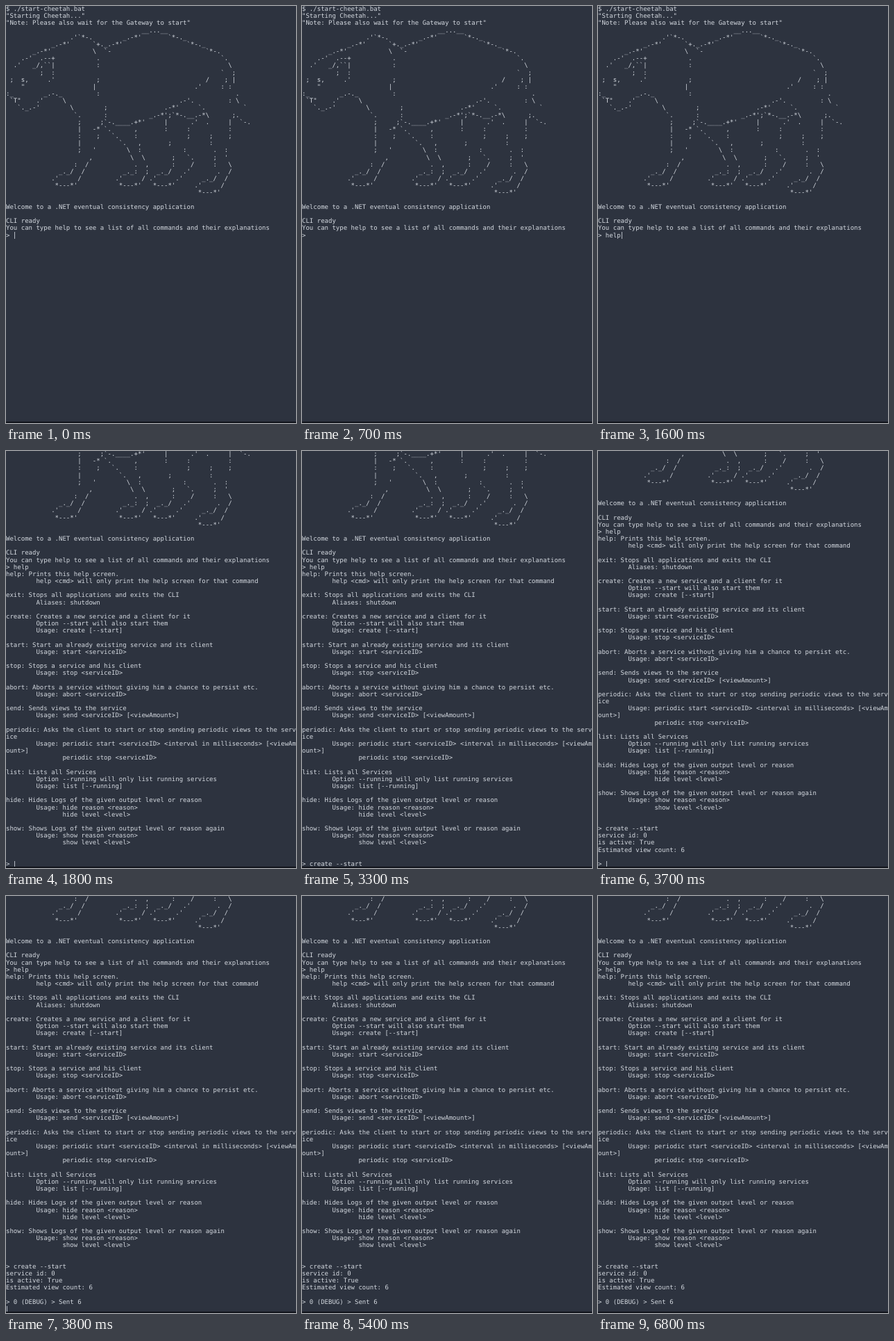
These frames come from a looping animation (418 px wide and 600 px high, 7000 ms). An HTML page:

```html
<!DOCTYPE html>
<html lang="en">
<head>
<meta charset="utf-8">
<title>Terminal session</title>
<style>
html, body { margin: 0; width: 100%; height: 100%; overflow: hidden; background: #2d333f; }
#stage { position: relative; width: 418px; height: 600px; overflow: hidden; background: #2d333f; }
#screen {
  position: absolute; left: 0; top: 0; margin: 0; color: #d3d8df;
  font: 9.02px/10.17px "DejaVu Sans Mono", "Liberation Mono", monospace;
  text-rendering: geometricPrecision; font-variant-ligatures: none;
}
#cursor { position: absolute; width: 1px; height: 10px; background: #b4bac3; }
#edge { position: absolute; left: 0; bottom: 0; width: 100%; height: 2px; background: #12151c; }
</style>
</head>
<body>
<div id="stage">
  <pre id="screen"></pre>
  <div id="cursor"></div>
  <div id="edge"></div>
</div>

<!-- Each row: column, glyphs, column, glyphs ... -->
<script type="text/plain" id="art">
36 __...__
17 .'`*-. 31 _.-*' 43 `*-._
12 _.-*' 23 `+._.-*' 48 `*-._
7 _.-*' 23 \ 26 `- 53 `*-.
4 .-' 9 .--+ 24 . 57 `.
2 .' 7 _/,``| 24 : 59 \
9 ; 12 : 57 ` 60 ;
1 ; 4 s, 11 .' 24 ; 53 / 58 ; 60 |
4 " 23 | 50 .' 57 : 59 :
0 :_ 10 _.-._ 24 : 61 .
1 `T" 8 .' 15 \ 46 .-'. 59 : 61 \
3 `._.-' 17 \ 26 ; 42 .-*' 51 `. 63 `
18 `. 26 : 38 _.-*';`*-.__.-*\ 60 ;.
19 ; 25 ;`-.____.+*' 42 | 49 .' 53 . 59 | 62 `-.
19 | 23 -* 26 `. 34 , 42 : 48 : 59 :
19 : 24 ; 28 `. 34 : 48 ; 54 ; 59 ;
19 | 30 `. 35 , 43 ; 54 :
19 ; 23 ' 32 \ 35 : 47 : 55 . 58 :
22 , 33 \ 36 \ 44 ; 48 `. 55 ; 58 '
18 : 21 / 34 . 37 , 44 : 49 / 55 : 59 \
14 _._/ 20 / 31 _._: 37 ; 40 _._/ 47 .' 56 . 59 /
12 .' 19 / 29 .' 36 / 38 .' 45 .' 52 _._/ 58 /
13 *---*' 30 *---*' 39 *---*' 50 .' 57 /
51 *---*'
</script>

<script type="text/plain" id="help">
help: Prints this help screen.
        help <cmd> will only print the help screen for that command

exit: Stops all applications and exits the CLI
        Aliases: shutdown

create: Creates a new service and a client for it
        Option --start will also start them
        Usage: create [--start]

start: Start an already existing service and its client
        Usage: start <serviceID>

stop: Stops a service and his client
        Usage: stop <serviceID>

abort: Aborts a service without giving him a chance to persist etc.
        Usage: abort <serviceID>

send: Sends views to the service
        Usage: send <serviceID> [<viewAmount>]

periodic: Asks the client to start or stop sending periodic views to the service
        Usage: periodic start <serviceID> <interval in milliseconds> [<viewAmount>]
               periodic stop <serviceID>

list: Lists all Services
        Option --running will only list running services
        Usage: list [--running]

hide: Hides Logs of the given output level or reason
        Usage: hide reason <reason>
               hide level <level>

show: Shows Logs of the given output level or reason again
        Usage: show reason <reason>
               show level <level>
</script>

<script>
const LOOP = 7000, COLS = 77, ROWS = 59, CELL_W = 5.43, CELL_H = 10.17;
const $ = id => document.getElementById(id);
const block = id => $(id).textContent.replace(/^\n|\n$/g, "");

const drawRow = row => row.split(" ").reduce(
  (line, part, i) => i % 2 ? line + part : line.padEnd(+part), "");

const intro = `$ ./start-cheetah.bat
"Starting Cheetah..."
"Note: Please also wait for the Gateway to start"
${block("art").split("\n").map(drawRow).join("\n")}

Welcome to a .NET eventual consistency application

CLI ready
You can type help to see a list of all commands and their explanations
> `;

// Output appended to the terminal at each time
const output = [
  [0, intro],
  [1100, "h"], [1200, "e"], [1400, "l"], [1600, "p"],
  [1800, "\n" + block("help") + "\n\n\n> "],
  [2700, "create --start"],
  [3400, "\n"],
  [3600, "service id: 0\nis active: True\nEstimated view count: 6\n\n> "],
  [3800, "0 (DEBUG) > Sent 6\n"],
];
// The cursor starts visible and flips at each time
const blinks = [400, 900, 2300, 2800, 3300, 3400, 4300, 4800, 5400, 5900, 6500];

const wrap = line => line.match(new RegExp(`.{1,${COLS}}`, "g")) || [""];

function render(t) {
  const text = output.filter(([at]) => at <= t).map(([, s]) => s).join("");
  const rows = text.split("\n").flatMap(wrap).slice(-ROWS);
  const shown = rows.join("\n");
  if ($("screen").textContent !== shown) $("screen").textContent = shown;

  const style = $("cursor").style;
  style.left = Math.round(rows.at(-1).length * CELL_W + 1) + "px";
  style.top = Math.round((rows.length - 1) * CELL_H) + "px";
  style.visibility = blinks.filter(at => at <= t).length % 2 ? "hidden" : "visible";
}

const start = performance.now();
function tick() {
  render((performance.now() - start) % LOOP);
  requestAnimationFrame(tick);
}
tick();
</script>
</body>
</html>
```
